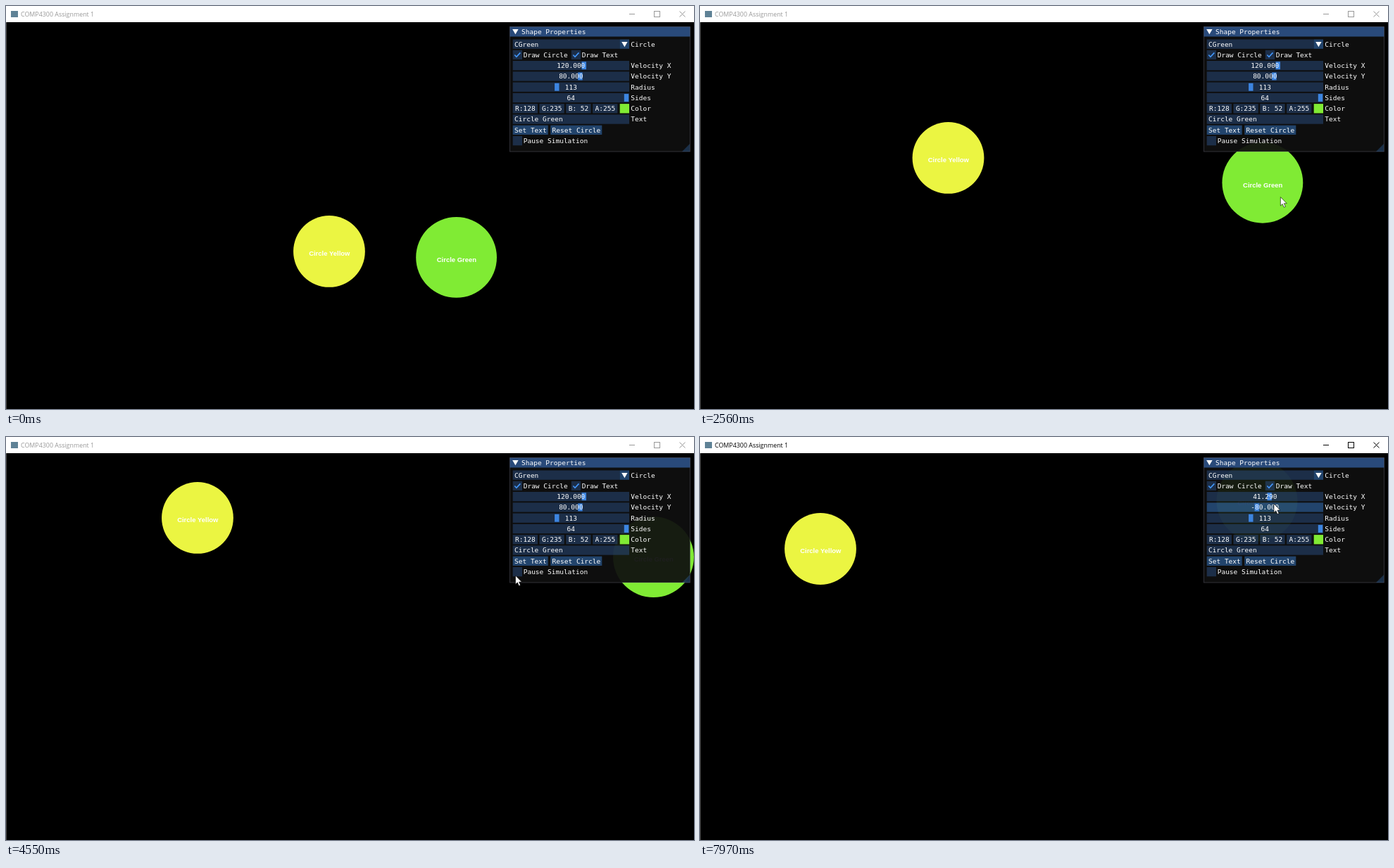
Animation of 977 by 573 pixels, one loop 8000 ms. Source, as an HTML page with a canvas:

```html
<!DOCTYPE html>
<html lang="en">
<head>
<meta charset="utf-8">
<title>Circles</title>
<style>
html, body { margin: 0; width: 100%; height: 100%; overflow: hidden; background: #000; }
canvas { display: block; }
</style>
</head>
<body>
<canvas id="stage" width="977" height="573"></canvas>
<script>
const ctx = document.getElementById('stage').getContext('2d');
const LOOP = 8000;
const PAUSE_AT = 4990, RESUME_AT = 5920, FOCUS_AT = 4950;
const DRAG_FROM = 7620, DRAG_TO = 7790;

const MONO = '9.5px "DejaVu Sans Mono", monospace';
const BOLD = 'bold 9.45px "Liberation Sans", Arial, sans-serif';
const TITLE = '8.9px "Open Sans", sans-serif';

const BLUE = 'rgb(66,150,250)';
const FRAME = 'rgba(41,74,122,.54)';
const HOVER = 'rgba(66,150,250,.4)';
const ACTIVE = 'rgba(66,150,250,.67)';
const GRAB = 'rgb(61,133,224)';
const GREEN = 'rgb(128,235,52)';
const YELLOW = 'rgb(235,245,66)';

// Paths: [time, x, y]
const yellowPath = [
  [0, 459, 349], [830, 424.5, 305.5], [1730, 386.5, 258.5], [3380, 319, 174],
  [4550, 272, 115], [PAUSE_AT, 254, 92.6], [RESUME_AT, 254, 92.6],
  [6100, 246.5, 83.5], [6290, 239, 74], [7970, 171, 159]
];
const greenPath = [
  [0, 639.5, 357.5], [830, 691, 323], [1730, 748, 285], [3380, 849, 218],
  [4550, 919.5, 170.7], [PAUSE_AT, 893.5, 153], [RESUME_AT, 893.5, 153],
  [6100, 883, 145.5], [DRAG_FROM, 791, 84.3], [7710, 788.5, 80.5],
  [DRAG_TO, 787.5, 83.5], [7970, 791, 91]
];
const cursorPath = [
  [2250, 955, 580], [2460, 860, 285], [2800, 740, 240], [3200, 700.5, 215],
  [3420, 700.5, 215], [3800, 712, 67], [4300, 723.5, 197], [4900, 723.5, 197],
  [4960, 725, 194.5], [5360, 725, 194.5], [5490, 716.5, 203], [5630, 716.5, 203],
  [5740, 725, 194.5], [6130, 725, 194.5], [6400, 755, 261], [6950, 783, 87],
  [DRAG_FROM, 783, 87], [DRAG_TO, 809, 88], [7940, 815, 95]
];

const rowY = i => 47.5 + i * 15.27;
const ROW_H = 13.3;
const LEFT = 719.7, WIDTH = 165.3;
let tip = null;

function along(path, t) {
  let i = 1;
  while (i < path.length - 1 && path[i][0] < t) i++;
  const [t0, x0, y0] = path[i - 1], [t1, x1, y1] = path[i];
  const k = Math.min(1, Math.max(0, (t - t0) / (t1 - t0)));
  return [x0 + (x1 - x0) * k, y0 + (y1 - y0) * k];
}

function rect(x, y, w, h, fill) {
  ctx.fillStyle = fill;
  ctx.fillRect(x, y, w, h);
}

function poly(points, fill) {
  ctx.beginPath();
  points.forEach(([x, y]) => ctx.lineTo(x, y));
  ctx.closePath();
  ctx.fillStyle = fill;
  ctx.fill();
}

function line(points, stroke, width) {
  ctx.beginPath();
  points.forEach(([x, y], i) => i ? ctx.lineTo(x, y) : ctx.moveTo(x, y));
  ctx.strokeStyle = stroke;
  ctx.lineWidth = width;
  ctx.stroke();
}

function text(str, x, y, font = MONO, align = 'left', fill = '#fff') {
  ctx.font = font;
  ctx.textAlign = align;
  ctx.fillStyle = fill;
  ctx.fillText(str, x, y);
}

const rowText = (str, x, i, align) => text(str, x, rowY(i) + 10, MONO, align);

function hovered(x, i, w) {
  if (!tip) return false;
  const dx = tip[0] - x, dy = tip[1] - rowY(i);
  return dx >= 0 && dx <= w && dy >= 0 && dy <= ROW_H - 2;
}

function frame(x, i, w, hit = w) {
  rect(x, rowY(i), w, ROW_H, hovered(x, i, hit) ? HOVER : FRAME);
}

function circle([x, y], r, fill, label) {
  ctx.beginPath();
  ctx.arc(x, y, r, 0, Math.PI * 2);
  ctx.fillStyle = fill;
  ctx.fill();
  text(label, x + .3, y + 6.3, BOLD, 'center');
}

function titleBar(focused) {
  const ink = focused ? '#000' : '#999';
  rect(0, 0, 977, 23, '#fff');
  rect(7, 7, 10, 9, '#5f8296');
  text('COMP4300 Assignment 1', 21, 15, TITLE, 'left', ink);
  line([[885, 11.5], [893, 11.5]], ink, 1);
  ctx.strokeRect(920.5, 7.5, 8, 8);
  line([[956.5, 7.5], [964.5, 15.5]], ink, 1);
  line([[964.5, 7.5], [956.5, 15.5]], ink, 1);
}

function downArrow(x, y) {
  poly([[x, y], [x + 8.4, y], [x + 4.2, y + 7.2]], '#fff');
}

function checkbox(x, i, label, on, labelX = x + 15) {
  frame(x, i, ROW_H, 15 + label.length * 5.72);
  if (on) {
    const y = rowY(i);
    line([[x + 2.6, y + 6.8], [x + 5.2, y + 9.6], [x + 10.7, y + 3.6]], BLUE, 1.6);
  }
  rowText(label, labelX, i);
}

function slider(i, label, value, grabX, active) {
  if (active) rect(LEFT, rowY(i), WIDTH, ROW_H, ACTIVE);
  else frame(LEFT, i, WIDTH);
  rect(grabX - 3.2, rowY(i) + 1.2, 6.4, ROW_H - 2.4, active ? BLUE : GRAB);
  rowText(value, 802.3, i, 'center');
  rowText(label, 887.3, i);
}

function button(x, i, w, label) {
  rect(x, rowY(i), w, ROW_H, hovered(x, i, w) ? BLUE : HOVER);
  rowText(label, x + 2.3, i);
}

function panel(t) {
  const dragging = t >= DRAG_FROM && t < DRAG_TO;
  const drag = Math.min(1, Math.max(0, (t - DRAG_FROM) / (DRAG_TO - DRAG_FROM)));
  const vx = t < 4565 ? 120 : -120 + 161.29 * drag;
  const vy = t < 7710 ? 80 : -80;
  const speedX = v => 802.3 + v * .154;

  rect(715.5, 29.5, 256, 177.5, 'rgba(15,15,15,.94)');
  rect(715.5, 29.5, 256, 14, 'rgb(41,74,122)');
  ctx.strokeStyle = 'rgba(110,110,128,.5)';
  ctx.lineWidth = .8;
  ctx.strokeRect(715.5, 29.5, 256, 177.5);
  poly([[971, 196], [971, 207], [960, 207]], 'rgba(66,150,250,.25)');
  downArrow(719.2, 33);
  text('Shape Properties', 732, 40);

  frame(LEFT, 0, 152, WIDTH);
  rect(871.7, rowY(0), ROW_H, ROW_H, HOVER);
  downArrow(874.2, 51);
  rowText('CGreen', 722, 0);
  rowText('Circle', 887.3, 0);

  checkbox(LEFT, 1, 'Draw Circle', true);
  checkbox(802.8, 1, 'Draw Text', true);

  slider(2, 'Velocity X', vx.toFixed(3), speedX(vx), dragging);
  slider(3, 'Velocity Y', vy.toFixed(3), speedX(vy) + .8);
  slider(4, 'Radius', '113', 782.3);
  slider(5, 'Sides', '64', 881);

  ['R:128', 'G:235', 'B: 52', 'A:255'].forEach((channel, k) => {
    const x = LEFT + k * 37.8;
    frame(x, 6, 35.3);
    rowText(channel, x + 17.7, 6, 'center');
  });
  rect(871.7, rowY(6), ROW_H, ROW_H, GREEN);
  rowText('Color', 887.3, 6);

  frame(LEFT, 7, WIDTH);
  rowText('Circle Green', 722, 7);
  rowText('Text', 887.3, 7);

  button(LEFT, 8, 50, 'Set Text');
  button(773.3, 8, 73, 'Reset Circle');
  checkbox(LEFT, 9, 'Pause Simulation', t >= PAUSE_AT && t < RESUME_AT);
}

function cursor([x, y]) {
  const shape = [[0, 0], [0, 12.4], [2.8, 9.8], [4.9, 14.6], [7, 13.7], [5, 9.1], [8.9, 9.1]];
  poly(shape.map(([dx, dy]) => [x + dx, y + dy]), '#fff');
  ctx.strokeStyle = '#000';
  ctx.lineWidth = .6;
  ctx.stroke();
}

function draw(t) {
  tip = t >= cursorPath[0][0] ? along(cursorPath, t) : null;
  rect(0, 0, 977, 573, '#000');
  circle(along(greenPath, t), 57.4, GREEN, 'Circle Green');
  circle(along(yellowPath, t), 50.9, YELLOW, 'Circle Yellow');
  rect(0, 23, 1, 550, '#484848');
  titleBar(t >= FOCUS_AT);
  panel(t);
  if (tip) cursor(tip);
}

const start = performance.now();
function tick() {
  draw((performance.now() - start) % LOOP);
  requestAnimationFrame(tick);
}
tick();
</script>
</body>
</html>
```
